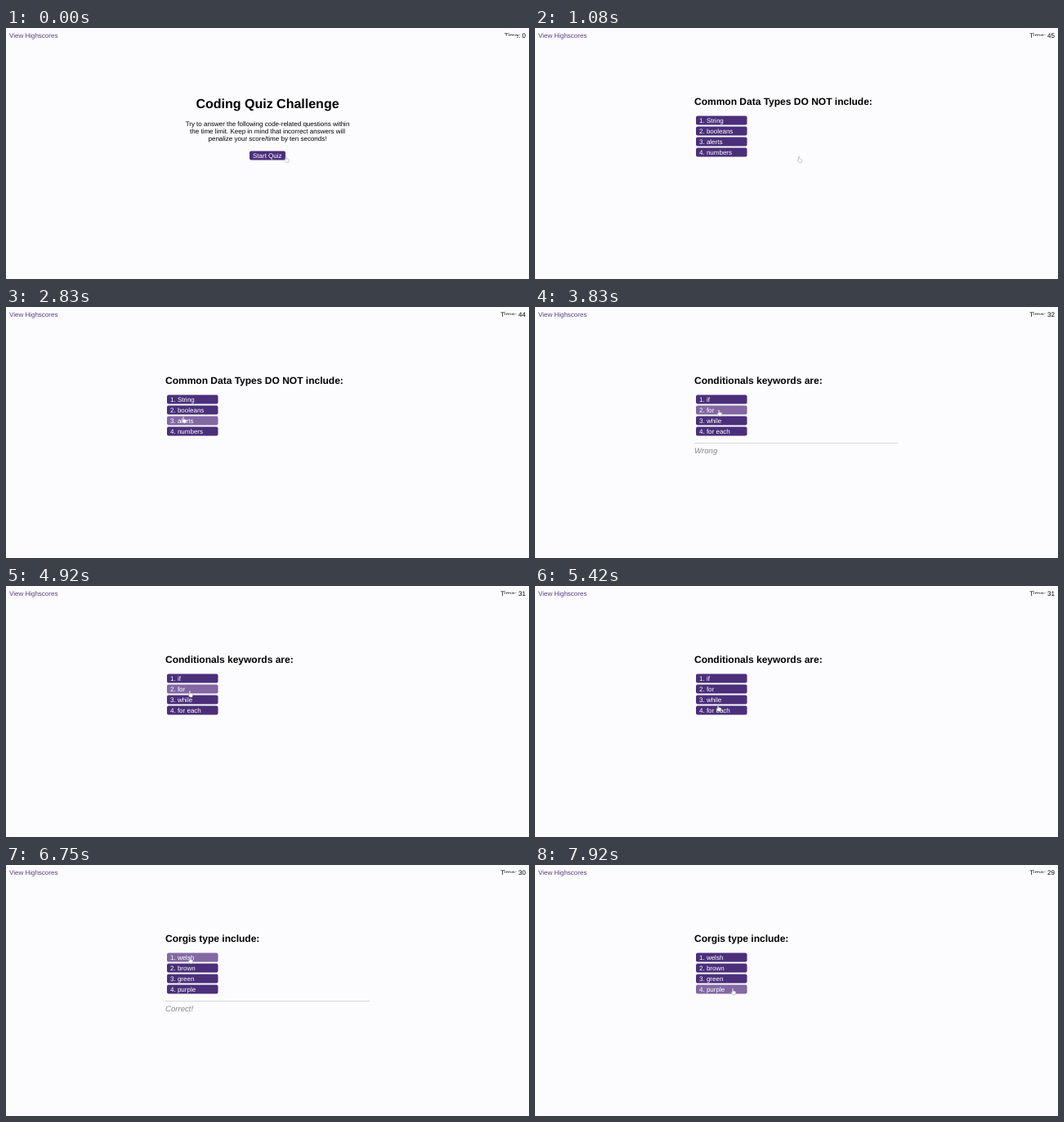
Recreate the animation shown at these times as an HTML page. Size 640 by 307 pixels, loop 8000 ms.

```html
<!DOCTYPE html>
<html lang="en">
<head>
<meta charset="utf-8">
<title>Coding quiz</title>
<style>
  html, body { margin: 0; width: 100%; height: 100%; overflow: hidden; background: #fcfcfe; }
  svg { display: block; width: 100%; height: 100%; }
  text { font: 8px "Liberation Sans", Arial, sans-serif; text-rendering: geometricPrecision; }
  .title { font-size: 16px; font-weight: bold; }
  .question { font-size: 12px; font-weight: bold; }
  .result { font-size: 9.6px; font-style: italic; fill: #85858c; }
  .link { fill: #563d7c; }
  .label { fill: #fff; }
</style>
</head>
<body>
<svg id="stage" viewBox="0 0 640 307"></svg>
<script>
const LOOP = 8000, STEP = 1000 / 12;
const BACK = '#fcfcfe', BUTTON = '#4b2f7a', HOVER = '#8368a4';
const TICK = 1250, PENALTY = 11, RESULT_TIME = 1000, MOVE_TIME = 420;
const stage = document.getElementById('stage');

// "result" is the verdict on the answer that opened the screen
const screens = [
  { at: 1000, title: 'Common Data Types DO NOT include:', choices: ['String', 'booleans', 'alerts', 'numbers'] },
  { at: 3420, title: 'Conditionals keywords are:', choices: ['if', 'for', 'while', 'for each'], result: 'Wrong' },
  { at: 6420, title: 'Corgis type include:', choices: ['welsh', 'brown', 'green', 'purple'], result: 'Correct!' }
];

// Pointer moves to x and to a height counted in answer rows
const moves = [
  { at: 580, x: 323, row: 3.8 },
  { at: 2420, x: 217, row: 2.05 },
  { at: 2830, x: 225, row: 1.4 },
  { at: 4830, x: 224, row: 2.92 },
  { at: 5670, x: 225, row: 0.4 },
  { at: 7420, x: 242, row: 3.35 }
];

const rowY = row => 107.5 + 13 * row;

function pointerAt(t) {
  let x = 342.5, row = 3.8;
  for (const move of moves) {
    const u = Math.min(1, Math.max(0, (t - move.at) / MOVE_TIME));
    const ease = u * u * (3 - 2 * u);
    x += (move.x - x) * ease;
    row += (move.row - row) * ease;
  }
  return [x, rowY(row)];
}

function secondsLeft(t) {
  const [first, afterWrong] = screens;
  if (t < first.at) return 0;
  const ticks = Math.max(0, Math.floor((t - first.at - 170) / TICK));
  return 45 - ticks - (t >= afterWrong.at ? PENALTY : 0);
}

const text = (x, y, string, type = '', anchor = 'start') =>
  `<text x="${x}" y="${y}" class="${type}" text-anchor="${anchor}">${string}</text>`;

const rect = (x, y, w, h, fill, r = 0) =>
  `<rect x="${x}" y="${y}" width="${w}" height="${h}" rx="${r}" fill="${fill}"/>`;

function button(x, y, w, label, [px, py]) {
  const over = px >= x && px < x + w && py >= y && py < y + 11;
  return rect(x, y, w, 11, over ? HOVER : BUTTON, 2) + text(x + 4, y + 8.2, label, 'label');
}

const startScreen = tip =>
  text(320, 98, 'Coding Quiz Challenge', 'title', 'middle') +
  ['Try to answer the following code-related questions within',
   'the time limit. Keep in mind that incorrect answers will',
   'penalize your score/time by ten seconds!'
  ].map((line, i) => text(320, 120 + i * 9.2, line, '', 'middle')).join('') +
  button(298, 150.5, 44, 'Start Quiz', tip);

const questionScreen = ({ title, choices }, tip) =>
  text(195, 94.4, title, 'question') +
  choices.map((choice, i) => button(197, rowY(i), 62.5, `${i + 1}. ${choice}`, tip)).join('');

const resultLine = result =>
  rect(195, 166, 250, 1, '#d6d6dc') + text(195, 179.4, result, 'result');

// The lower part of the word "Time" is hidden
const clock = seconds =>
  text(636, 11.7, `Time: ${seconds}`, '', 'end') + rect(610, 9.5, 15, 4, BACK);

const hand = ([x, y]) =>
  `<path transform="translate(${x} ${y})" fill="#fff" stroke="#9a98a2" stroke-width=".5"
    d="M-.6 .3Q0-.4 .6 .3V3L3 3.5Q4 3.8 3.8 5L3 7.8H0L-2 5Q-2.2 4-.6 4.6Z"/>`;

function draw(now) {
  const t = Math.floor((now % LOOP + 4) / STEP) * STEP + 5;
  const tip = pointerAt(t);
  const screen = screens.findLast(s => s.at <= t);
  const showResult = screen?.result && t < screen.at + RESULT_TIME;
  stage.innerHTML =
    text(4, 11.7, 'View Highscores', 'link') +
    clock(secondsLeft(t)) +
    (screen ? questionScreen(screen, tip) : startScreen(tip)) +
    (showResult ? resultLine(screen.result) : '') +
    hand(tip);
}

const begin = performance.now();
function frame() {
  draw(performance.now() - begin);
  requestAnimationFrame(frame);
}
frame();
</script>
</body>
</html>
```
